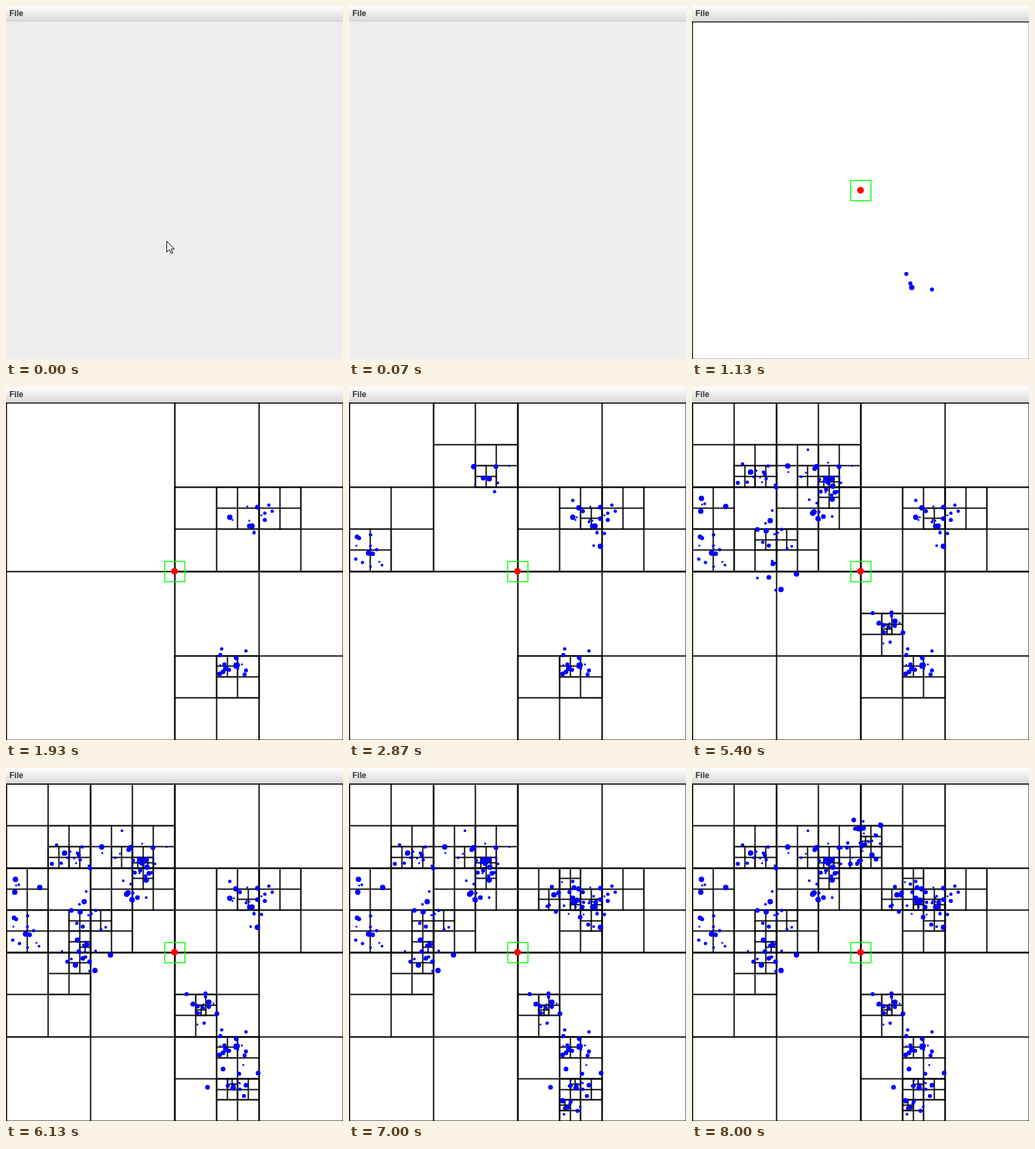
An HTML page with a canvas that plays this animation: 500 by 523 pixels, repeating every 9.79 s.

```html
<!DOCTYPE html>
<html lang="en">
<head>
<meta charset="utf-8">
<title>Quadtree</title>
<style>
html, body { margin: 0; width: 100%; height: 100%; overflow: hidden; background: #eee; }
canvas { position: absolute; left: 0; top: 0; }
#bar {
  position: absolute; left: 0; top: 0; width: 500px; height: 22px;
  background: linear-gradient(#fff, #dadada); border-bottom: 1px solid #ccc;
  font: bold 12px/22px "Liberation Sans", Arial, sans-serif; color: #333;
}
#bar span { position: absolute; left: 5px; top: 0; }
#mouse { position: absolute; left: 238px; top: 348px; }
</style>
</head>
<body>
<canvas id="stage" width="500" height="523"></canvas>
<div id="bar"><span>File</span></div>
<svg id="mouse" width="13" height="20" viewBox="0 0 13 20">
  <path d="M.5 .5V16.5L4.5 13L7 18.5L9.5 17.5L7 12H11.8Z" fill="#fff" stroke="#000"/>
</svg>
<script>
const LOOP = 9790, START = 1130, TOP = 23, SIZE = 500;
const FIRST_TICK = 17, LAST_TICK = 120;
const CAPACITY = 4, MAX_DEPTH = 6;

// Where the spray brush rests: until (ms), x, y, reach.
const STOPS = [
  [1600, 341, 412, 32],
  [1900, 375, 195, 40],
  [2200, 358, 203, 45],
  [2470, 205, 135, 38],
  [2870, 31, 243, 34],
  [3050, 45, 178, 35],
  [3470, 95, 130, 38],
  [3600, 170, 130, 40],
  [3800, 208, 165, 42],
  [4330, 290, 354, 30],
  [4600, 200, 153, 30],
  [4850, 179, 187, 22],
  [5130, 125, 215, 45],
  [5700, 122, 262, 42],
  [6130, 338, 468, 45],
  [6400, 326, 500, 30],
  [7130, 335, 198, 42],
  [8000, 255, 112, 38]
];

const ctx = document.getElementById('stage').getContext('2d');
const mouse = document.getElementById('mouse');

function seeded(seed) {
  return () => {
    seed = (seed + 0x6D2B79F5) | 0;
    let n = Math.imul(seed ^ (seed >>> 15), seed | 1);
    n ^= n + Math.imul(n ^ (n >>> 7), n | 61);
    return ((n ^ (n >>> 14)) >>> 0) / 4294967296;
  };
}

// 15 ticks a second on a 10 ms clock; each tick sprays four to one dots.
function sprayDots() {
  const random = seeded(11), dots = [];
  for (let tick = FIRST_TICK; tick <= LAST_TICK; tick++) {
    const at = Math.round(tick * 20 / 3) * 10;
    const [, cx, cy, reach] = STOPS.find(([until]) => at <= until);
    const count = 4 - (tick - FIRST_TICK) % 4;
    for (let i = 0; i < count; i++) {
      const angle = random() * Math.PI * 2;
      const dist = random() * reach;
      dots.push({
        at,
        x: Math.round(cx + Math.cos(angle) * dist),
        y: Math.round(cy + Math.sin(angle) * dist),
        r: (3 + Math.floor(random() * 6)) / 2
      });
    }
  }
  return dots;
}
const allDots = sprayDots();

function disc(color, x, y, r) {
  ctx.fillStyle = color;
  ctx.beginPath();
  ctx.arc(x, y, r, 0, Math.PI * 2);
  ctx.fill();
}

function box(color, x, y, size) {
  const left = Math.floor(x), top = Math.floor(y);
  ctx.strokeStyle = color;
  ctx.lineWidth = 1.5;
  ctx.strokeRect(left + 0.5, top + 0.5,
    Math.floor(x + size) - left, Math.floor(y + size) - top);
}

// A cell holding too many dots splits into four.
function drawCell(x, y, size, dots, depth) {
  box('#000', x, y, size);
  if (dots.length <= CAPACITY || depth === MAX_DEPTH) return;
  const half = size / 2;
  const quarters = [[], [], [], []];
  for (const dot of dots) {
    quarters[(dot.x >= x + half) + 2 * (dot.y >= y + half)].push(dot);
  }
  quarters.forEach((part, q) =>
    drawCell(x + (q & 1) * half, y + (q >> 1) * half, half, part, depth + 1));
}

function draw(t) {
  mouse.style.display = t < 70 ? '' : 'none';
  ctx.fillStyle = t < START ? '#eee' : '#fff';
  ctx.fillRect(0, 0, SIZE, SIZE + TOP);
  if (t < START) return;

  const dots = allDots.filter(dot => dot.at <= t);
  drawCell(0, TOP, SIZE, dots, 0);
  for (const { x, y, r } of dots) disc('#00f', x, y, r);
  disc('#f00', 250, 273, 5);
  box('#0f0', 235, 258, 30);
}

function frame() {
  draw(performance.now() % LOOP);
  requestAnimationFrame(frame);
}
frame();
</script>
</body>
</html>
```
